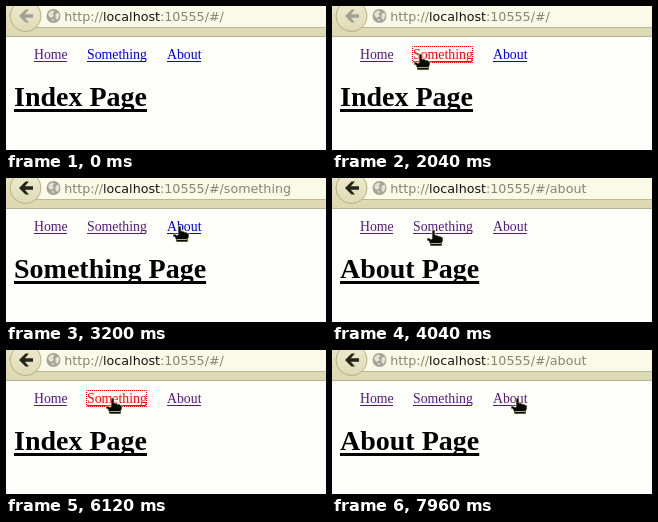
These frames come from a looping animation (320x144 px, 8 s). An HTML page:

```html
<!DOCTYPE html>
<html lang="en">
<head>
<meta charset="utf-8">
<title>Page navigation</title>
<style>
html, body { margin: 0; width: 100%; height: 100%; overflow: hidden; background: #fefefa; }
svg { display: block; width: 320px; height: 144px; }
.url { font: 12.7px "DejaVu Sans", sans-serif; fill: #85846f; }
.url .host { fill: #111; }
.link { font: 13.8px "Liberation Serif", serif; }
.head { font: bold 28px "Liberation Serif", serif; }
#cursor path { fill: #080804; stroke: #f4f2c8; stroke-width: .7px; }
</style>
</head>
<body>
<svg viewBox="0 0 320 144" xmlns="http://www.w3.org/2000/svg">
  <defs>
    <linearGradient id="bar" x1="0" y1="0" x2="0" y2="1">
      <stop offset="0" stop-color="#e6e2c2"/>
      <stop offset="1" stop-color="#dcd8b0"/>
    </linearGradient>
    <linearGradient id="knob" x1="0" y1="0" x2="0" y2="1">
      <stop offset="0" stop-color="#efecd0"/>
      <stop offset="1" stop-color="#dfdbb6"/>
    </linearGradient>
  </defs>
  <rect width="320" height="144" fill="#fefefa"/>
  <rect width="320" height="30" fill="url(#bar)"/>
  <rect y="30" width="320" height="1" fill="#b9b48f"/>
  <path d="M28 -1H321V21.5H28Z" fill="#fbfae8" stroke="#bcb892"/>
  <circle cx="19.5" cy="10" r="15.5" fill="url(#knob)" stroke="#b3ae88"/>
  <path id="back" d="M13 10L19.5 3.5H23L18.8 8.3H27V11.7H18.8L23 16.5H19.5Z"/>
  <circle cx="47.5" cy="10" r="7" fill="#a3a295"/>
  <path d="M42.5 7L46 4.5L48.5 5.5L46.5 8L48 10L45 12L42.5 10ZM49.5 8L52.5 6.5L53.5 10L51.5 14L49.5 12.5ZM45 13.5L48 13L47.5 15.5Z" fill="#e5e3d2"/>
  <text class="url" x="58.2" y="15">http://<tspan class="host">localhost</tspan><tspan id="route"></tspan></text>
  <g id="nav"></g>
  <text id="head" class="head" x="8" y="100"></text>
  <rect id="rule" x="8" y="103" height="3"/>
  <g id="cursor">
    <g id="hand">
      <path d="M-2 0H1V5H4V6H7V7H9V12H8V16H-4V13H-5V11H-7V8H-4V9H-2Z"/>
      <path d="M-3 13.5H7"/>
    </g>
    <path id="arrow" d="M0 0V15L3.5 11.8L6 17.2L8.4 16L6 10.9H10.8Z"/>
  </g>
</svg>
<script>
const LOOP = 8000, STEP = 40, HOLD = 120, NUDGE = 320;
const $ = id => document.getElementById(id);

const links = [
  { label: "Home", x: 28, title: "Index Page", route: "", focus: "#333" },
  { label: "Something", x: 81, title: "Something Page", route: "something", focus: "#f00" },
  { label: "About", x: 161, title: "About Page", route: "about", focus: "#f00" }
];

// The pointer lands short of x (short = part of the way left, dip = height below),
// nudges onto it by "settle", then presses the link.
const visits = [
  { link: 1, x: 89, land: 1440, settle: 1640, press: 2040, short: .02, dip: 3 },
  { link: 2, x: 174, land: 2760, settle: 3200, press: 3520, short: .5, dip: 44 },
  { link: 0, x: 48, land: 4320, settle: 4760, press: 5080, short: .1, dip: 6 },
  { link: 1, x: 107, land: 5440, settle: 5960, press: 6120, short: .05, dip: 3 },
  { link: 2, x: 180, land: 6920, settle: 6960, press: 7400, short: .02, dip: 1 },
  { x: 186, land: 7920, settle: 7960, press: LOOP, short: 1, dip: 0 }
];
const REST_Y = 48, ENTER = { x: 138, y: 150, t: 1080 };

function make(tag, attrs) {
  const el = document.createElementNS("http://www.w3.org/2000/svg", tag);
  for (const k in attrs) el.setAttribute(k, attrs[k]);
  return $("nav").appendChild(el);
}

for (const l of links) {
  l.text = make("text", { class: "link", x: l.x, y: 53 });
  l.text.textContent = l.label;
  l.w = Math.floor(l.text.getComputedTextLength());
  l.line = make("rect", { x: l.x, y: 55, width: l.w, height: 1 });
  l.ring = make("rect", {
    x: l.x - .5, y: 40.5, width: l.w + 1, height: 16, fill: "none",
    stroke: l.focus, "stroke-dasharray": "1 1", "stroke-dashoffset": .5
  });
}

const mix = (a, b, u) => a + (b - a) * u;
function ease(t, t0, t1) {
  const u = Math.min(1, Math.max(0, (t - t0) / (t1 - t0)));
  return u * u * (3 - 2 * u);
}

function pointer(t) {
  let { x, y, t: start } = ENTER;
  for (const v of visits) {
    const go = ease(t, start, v.land);
    const nudge = ease(t, Math.max(v.land, v.settle - NUDGE), v.settle);
    const nearX = mix(v.x, x, v.short);
    x = mix(mix(x, nearX, go), v.x, nudge);
    y = mix(mix(y, REST_Y + v.dip, go), REST_Y, nudge);
    start = v.press + HOLD;
    if (t < start) break;
  }
  return [Math.round(x), Math.round(y)];
}

function draw(t) {
  let page = links[0], held = null;
  const seen = new Set([page]);
  for (const v of visits) {
    const link = links[v.link];
    if (t >= v.press + HOLD) seen.add(page = link);
    else if (t >= v.press) held = link;
  }
  $("route").textContent = ":10555/#/" + page.route;
  $("head").textContent = page.title;
  $("rule").setAttribute("width", $("head").getComputedTextLength());

  for (const l of links) {
    const color = l === held ? "#f00" : seen.has(l) ? "#551a78" : "#0000dd";
    l.text.setAttribute("fill", color);
    l.line.setAttribute("fill", color);
    l.ring.setAttribute("visibility", l === held ? "visible" : "hidden");
  }

  const first = visits[0].press + HOLD;
  const grey = Math.round(mix(160, 36, ease(t, first, first + 240)));
  $("back").setAttribute("fill", `rgb(${grey},${grey},${grey - 12})`);

  const [x, y] = pointer(t);
  const over = links.some(l => x >= l.x && x <= l.x + l.w && y >= 41 && y <= 57);
  $("cursor").setAttribute("transform", `translate(${x} ${y})`);
  $("cursor").setAttribute("visibility", t < ENTER.t + STEP ? "hidden" : "visible");
  $("hand").setAttribute("display", over ? "inline" : "none");
  $("arrow").setAttribute("display", over ? "none" : "inline");
}

const start = performance.now();
function tick() {
  const t = (performance.now() - start) % LOOP;
  draw(Math.floor(t / STEP) * STEP);
  requestAnimationFrame(tick);
}
draw(0);
requestAnimationFrame(tick);
</script>
</body>
</html>
```
